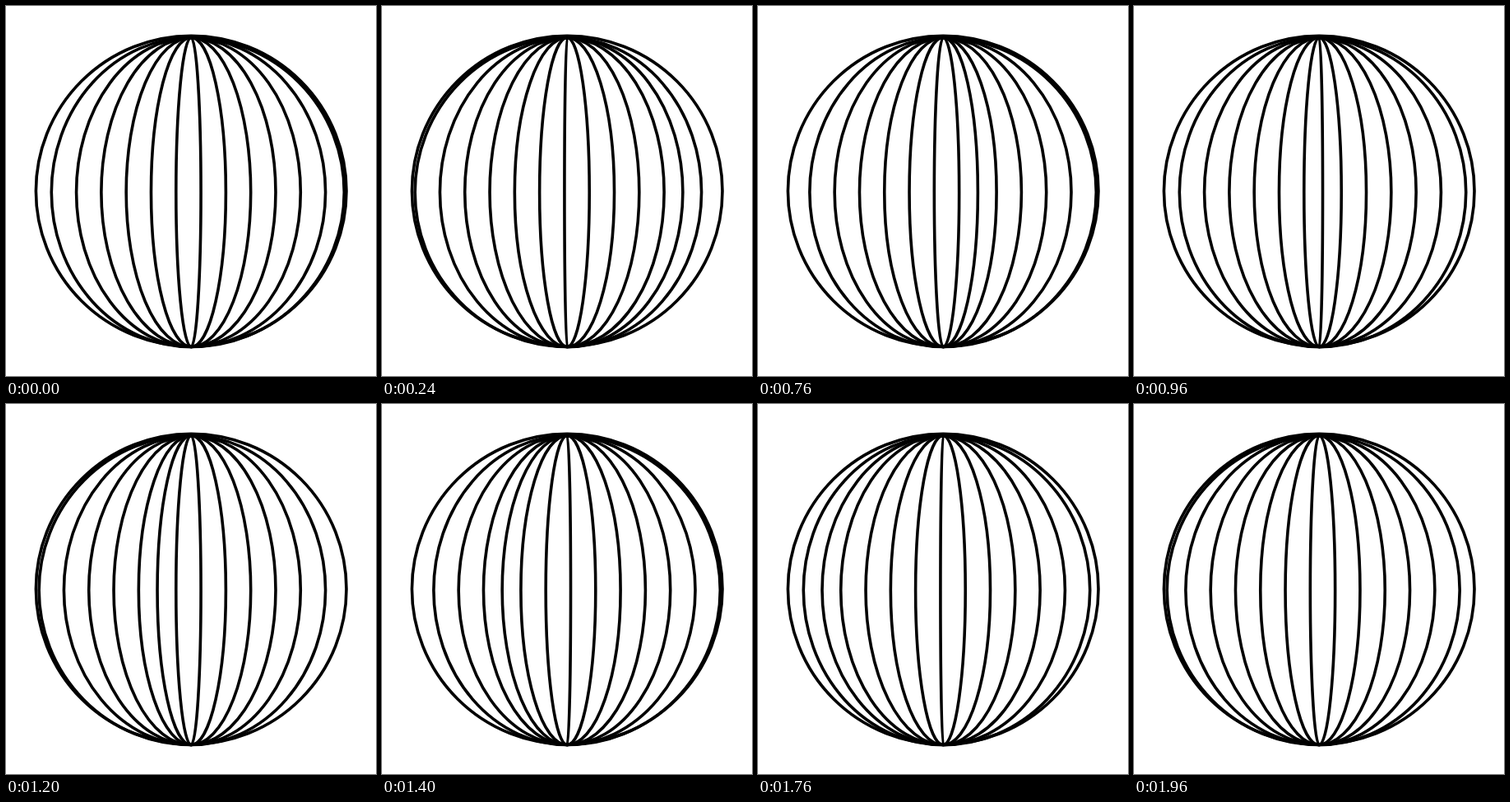
An HTML page with a canvas for the animation above (2 s loop, 450 by 450 pixels).

```html
<!DOCTYPE html>
<html>
<head>
<meta charset="utf-8">
<style>
  html, body { margin: 0; width: 100%; height: 100%; overflow: hidden; background: #fff; }
  canvas { display: block; }
</style>
</head>
<body>
<canvas id="stage" width="450" height="450"></canvas>
<script>
const ctx = document.getElementById('stage').getContext('2d');
const CX = 225.2, CY = 225, R = 188.8;
const POLE_Y = 226.5, POLE_R = 188;  // meridians sit slightly low in the outline
const STEP = 40, STEPS = 50, LEAD = 16;
const FIRST_X = 411.3, SPEED = 7.575;  // pixels per step, leftwards

// Start step of each meridian: one alone, twelve evenly spaced
const starts = [0];
for (let i = 0; i < 12; i++) starts.push(3 + 4 * i);

function meridian(x) {
  const east = x > CX;
  ctx.beginPath();
  ctx.ellipse(CX, POLE_Y, Math.abs(x - CX), POLE_R, 0, -Math.PI / 2, Math.PI / 2, !east);
  ctx.stroke();
}

function draw(step) {
  ctx.fillStyle = '#fff';
  ctx.fillRect(0, 0, 450, 450);
  ctx.strokeStyle = '#000';
  ctx.lineWidth = 3.6;
  ctx.beginPath();
  ctx.arc(CX, CY, R, 0, 2 * Math.PI);
  ctx.stroke();
  for (const start of starts) {
    const age = (step - start + STEPS) % STEPS;
    meridian(FIRST_X - SPEED * age);
  }
}

const begin = performance.now();
function tick() {
  const elapsed = performance.now() - begin + LEAD;
  draw(Math.floor(elapsed / STEP) % STEPS);
  requestAnimationFrame(tick);
}
tick();
</script>
</body>
</html>
```
